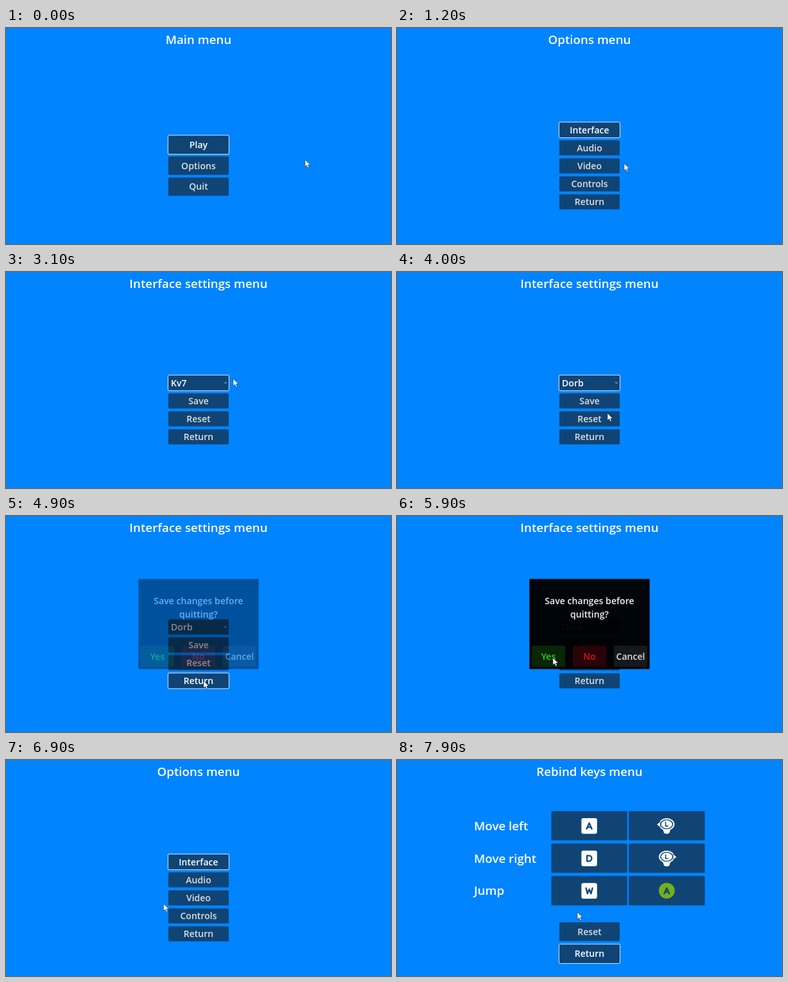
These frames come from a looping animation (600 by 338 pixels, 8 s). An HTML page:

```html
<!DOCTYPE html>
<html lang="en">
<head>
<meta charset="utf-8">
<title>Game menu</title>
<style>
html, body { margin: 0; width: 100%; height: 100%; overflow: hidden; background: #0084ff; }
svg { display: block; width: 600px; height: 338px; }
text { font: 600 14.1px "Open Sans", "Noto Sans", sans-serif; fill: #dfdfdf; }
.big { font-size: 18.75px; fill: #fff; }
.mid { text-anchor: middle; }
.box { fill: #1a1a1a; fill-opacity: .6; }
.ring { fill: none; stroke: #fff; stroke-opacity: .8; }
.on text { fill: #fff; }
.glyph { fill: none; stroke: #0f4475; stroke-width: 2.3; stroke-linecap: round; stroke-linejoin: round; }
</style>
</head>
<body>
<svg id="stage" viewBox="0 0 600 338"></svg>
<script>
const NS = "http://www.w3.org/2000/svg";
const LOOP = 8000;
const stage = document.getElementById("stage");

function add(parent, tag, attrs = {}, label) {
  const el = document.createElementNS(NS, tag);
  for (const key in attrs) el.setAttribute(key, attrs[key]);
  if (label !== undefined) el.textContent = label;
  return parent.appendChild(el);
}

const rect = (p, x, y, width, height, attrs) => add(p, "rect", { x, y, width, height, ...attrs });
const write = (p, x, y, label, cls = "mid", attrs = {}) => add(p, "text", { x, y, class: cls, ...attrs }, label);
const shift = (p, x, y) => add(p, "g", { transform: `translate(${x} ${y})` });

function button(parent, y, h, label, left) {
  const g = add(parent, "g");
  rect(g, 253, y, 94, h, { rx: 1.5, class: "box" });
  const ring = rect(g, 252.5, y - .5, 95, h + 1, { rx: 1.5, class: "ring" });
  const text = write(g, left ? 257 : 300, y + h / 2 + 5.1, label, left ? "" : "mid");
  return { g, ring, text };
}

function screen(title) {
  const g = add(stage, "g");
  write(g, 300, 25, title, "mid big");
  return { g, buttons: [] };
}

function column(s, top, pitch, h, labels) {
  s.buttons = labels.map((label, i) => button(s.g, top + i * pitch, h, label));
}

const KEYS = {
  A: "M-4 4.6L0-4.4L4 4.6M-2.6 2H2.6",
  D: "M-3.4-4.4V4.4H-.6A4.4 4.4 0 0 0-.6-4.4Z",
  W: "M-5-4.4L-2.7 4.4L0-2.6L2.7 4.4L5-4.4"
};

function stick(parent, x, y, dir) {
  const g = shift(parent, x, y);
  add(g, "path", { d: "M-7 7.5H7Q4.6 9.5 4.6 12.5Q4 15 0 15Q-4 15-4.6 12.5Q-4.6 9.5-7 7.5Z", fill: "#fff" });
  add(g, "ellipse", { rx: 11.2, ry: 8.6, fill: "#0f4475", stroke: "#fff", "stroke-width": 2 });
  add(g, "ellipse", { rx: 8.6, ry: 6.3, fill: "#fff" });
  add(g, "path", { d: "M-1.7-3V2.8H1.9", class: "glyph", style: "stroke-width:1.6" });
  add(g, "path", { d: `M${15.6 * dir} .3L${10 * dir}-4.2V4.8Z`, fill: "#fff", stroke: "#0f4475", "stroke-width": .7 });
}

const main = screen("Main menu");
column(main, 168.3, 32.8, 28.7, ["Play", "Options", "Quit"]);

const options = screen("Options menu");
column(options, 147.7, 28.15, 23.5, ["Interface", "Audio", "Video", "Controls", "Return"]);

const settings = screen("Interface settings menu");
const STYLES = ["Kv7", "Dorb"];
const picker = button(settings.g, 161.8, 23.5, STYLES[0], true);
add(picker.g, "path", { d: "M339.8 172.3L341.9 174.4L344 172.3", fill: "none", stroke: "#dfdfdf", "stroke-width": .9 });
column(settings, 189.9, 28.15, 23.5, ["Save", "Reset", "Return"]);
settings.buttons.unshift(picker);

const popup = add(stage, "g");
rect(popup, 252.5, 185.8, 95.5, 48.7, { fill: "#1a1a1a" });
const marker = rect(popup, 254, 0, 92.5, 22.5, { fill: "#3a3a3a" });
STYLES.forEach((name, i) => {
  const y = 198.2 + i * 23.8;
  add(popup, "circle", { cx: 261.5, cy: y, r: 3.4, fill: "none", stroke: "#dfdfdf" });
  if (!i) add(popup, "circle", { cx: 261.5, cy: y, r: 1.6, fill: "#dfdfdf" });
  write(popup, 270, y + 5, name, "");
});

const rebind = screen("Rebind keys menu");
[["Move left", "A"], ["Move right", "D"], ["Jump", "W"]].forEach(([label, key], i) => {
  const y = 80 + i * 50.8;
  write(rebind.g, 120, y + 29.7, label, "big");
  for (const x of [240.5, 361.3]) rect(rebind.g, x, y, 118.4, 45.8, { rx: 1.5, class: "box" });
  const tile = shift(rebind.g, 299.6, y + 23.2);
  rect(tile, -12.2, -12.2, 24.4, 24.4, { rx: 3, fill: "#fff" });
  add(tile, "path", { d: KEYS[key], class: "glyph" });
  if (i < 2) return stick(rebind.g, 420.3, y + 20.6, i ? 1 : -1);
  const pad = shift(rebind.g, 420.4, y + 23);
  add(pad, "circle", { r: 12.4, fill: "#74b01c" });
  add(pad, "path", { d: KEYS.A, class: "glyph" });
});
rebind.buttons = [button(rebind.g, 254, 29.3, "Reset"), button(rebind.g, 288.6, 29.3, "Return")];

const dialog = add(stage, "g");
rect(dialog, 206.3, 98.5, 187.4, 141, { fill: "#000", "fill-opacity": .96 });
write(dialog, 300, 138, "Save changes before", "mid", { style: "fill:#f2f2f2" });
write(dialog, 300, 159.3, "quitting?", "mid", { style: "fill:#f2f2f2" });
[["Yes", "#2fd016", "#0a2607"], ["No", "#e30d20", "#290307"], ["Cancel", "#dfdfdf", "#17191c"]].forEach(([label, ink, fill], i) => {
  const x = 210 + i * 64;
  rect(dialog, x, 203, 52, 33, { rx: 1.5, fill });
  write(dialog, x + 26, 224.6, label, "mid", { style: `fill:${ink}` });
});

const cursor = add(stage, "path", {
  d: "M0 0V11.2L2.6 8.8L4.5 13L6.4 12.2L4.6 8.1H8.1Z",
  fill: "#fff", stroke: "#1c2a3a", "stroke-width": .6
});

// Pointer stops: time, x, y
const PATH = [
  [0, 466, 206], [60, 466, 206], [580, 336, 216], [690, 336, 216], [920, 353, 213],
  [1200, 354, 212], [1500, 360, 209], [1800, 338, 198], [2000, 334, 162], [2520, 334, 162],
  [3050, 354, 167], [3110, 354, 167], [3330, 341, 174], [3460, 341, 174], [3830, 328, 221],
  [4110, 328, 221], [4700, 308, 258], [4910, 308, 258], [5700, 243, 222], [6730, 243, 222],
  [6900, 245.5, 225], [7110, 264, 243], [7260, 264, 243], [7900, 281, 238], [8000, 281, 238]
];

// Focus changes: time, button index
const FOCUS = [
  [main, [[0, 0], [420, 1]]],
  [options, [[0, 0], [1630, 2], [1740, 1], [1880, 0], [6990, 3]]],
  [settings, [[0, 0], [4290, 1], [4390, 2], [4490, 3], [5120, -1]]],
  [rebind, [[0, 1]]]
];

const ramp = (t, a, b) => Math.min(1, Math.max(0, (t - a) / (b - a)));
const fade = (t, a, out) => ramp(t, a, a + 250) * (1 - ramp(t, out, out + 250));

function show(el, alpha) {
  el.style.display = alpha > 0 ? "" : "none";
  el.style.opacity = alpha;
}

function pointer(t) {
  const i = Math.max(1, PATH.findIndex(p => p[0] > t));
  const [t0, x0, y0] = PATH[i - 1], [t1, x1, y1] = PATH[i];
  const u = ramp(t, t0, t1), k = u * u * (3 - 2 * u);
  return [x0 + (x1 - x0) * k, y0 + (y1 - y0) * k];
}

function draw(t) {
  show(main.g, fade(t, -500, 680));
  show(options.g, Math.max(fade(t, 920, 2510), fade(t, 6420, 7230)));
  show(settings.g, fade(t, 2780, 6150));
  show(rebind.g, fade(t, 7500, 9000));
  show(dialog, fade(t, 4802, 5900));
  show(popup, t >= 3380 && t < 3960 ? 1 : 0);

  for (const [s, steps] of FOCUS) {
    const active = steps.filter(step => step[0] <= t).pop()[1];
    s.buttons.forEach((b, i) => {
      b.ring.style.display = i === active ? "" : "none";
      b.g.setAttribute("class", i === active ? "on" : "");
    });
  }

  const [x, y] = pointer(t);
  cursor.setAttribute("transform", `translate(${x} ${y})`);
  marker.style.display = y > 186 ? "" : "none";
  marker.setAttribute("y", y > 210 ? 210.8 : 187);
  picker.text.textContent = STYLES[t < 3960 ? 0 : 1];
}

const start = performance.now();
function tick() {
  draw((performance.now() - start) % LOOP);
  requestAnimationFrame(tick);
}
draw(0);
tick();
</script>
</body>
</html>
```
